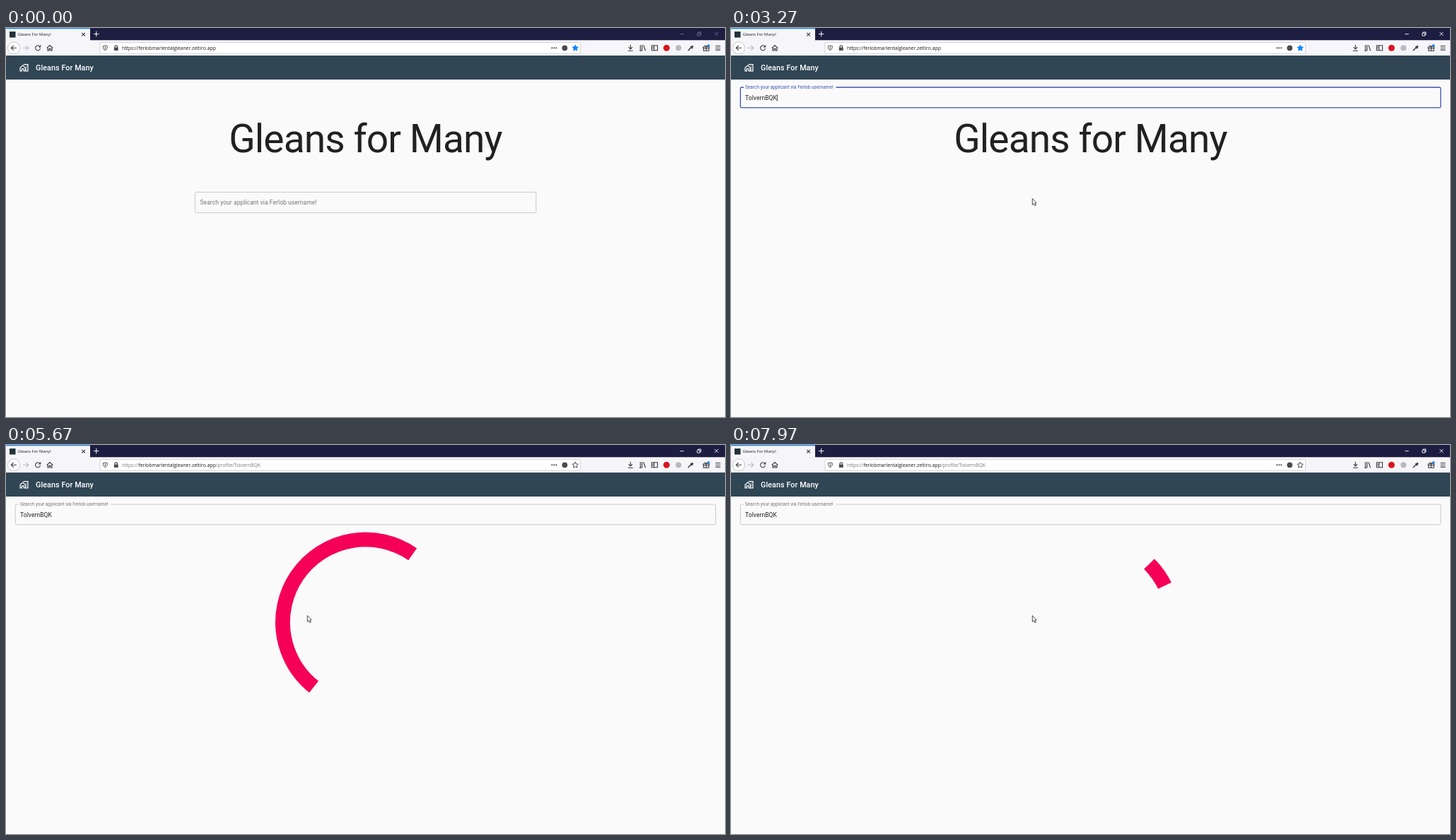
Animation of 1017 by 551 pixels, one loop 8000 ms. Source, as an HTML page:

```html
<!DOCTYPE html>
<html lang="en">
<head>
<meta charset="utf-8">
<title>Gleans For Many!</title>
<style>
html, body { margin: 0; width: 100%; height: 100%; overflow: hidden; background: #fafafa; }
svg { display: block; width: 1017px; height: 551px; }
text { font-family: Roboto, sans-serif; }
.ui { font-family: "Open Sans", "Noto Sans", sans-serif; }
.line { fill: none; stroke: #38383d; stroke-width: 1.1; }
.field { font-size: 8.48px; letter-spacing: .08px; }
</style>
</head>
<body>
<svg viewBox="0 0 1017 551" xmlns="http://www.w3.org/2000/svg">
  <rect width="1017" height="551" fill="#fafafa"/>

  <!-- page -->
  <text id="title" x="508.5" y="175.5" text-anchor="middle" font-size="55" letter-spacing="-.86" fill="#212121">Gleans for Many</text>
  <g id="middle">
    <rect id="middleBox" x="267.4" y="232.5" width="482.4" height="29.2" rx="2" fill="none" stroke-width=".9"/>
    <text class="field" x="274.5" y="250.1" fill="#757575">Search your applicant via Ferlob username!</text>
  </g>
  <g id="top">
    <path id="topBox" fill="none" d="M18 84H15.3a2 2 0 0 0-2 2V110.8a2 2 0 0 0 2 2H1001.8a2 2 0 0 0 2-2V86a2 2 0 0 0-2-2H148.5"/>
    <text id="label" x="20" y="86" font-size="6.4" letter-spacing=".06">Search your applicant via Ferlob username!</text>
    <text id="typed" class="field" x="20" y="101.8" fill="#212121"></text>
    <rect id="caret" y="94" width=".8" height="9.6" fill="#212121"/>
  </g>
  <circle id="spinner" cx="508.5" cy="251" r="117.07" fill="none" stroke="#f50057" stroke-width="20.86"/>

  <!-- app bar -->
  <rect y="39" width="1017" height="34" fill="#304654"/>
  <g fill="none" stroke="#fff" stroke-width="1.2">
    <path d="M20 56.2l3.7-3.2 3.7 3.2v4.7h-2.3v-3h-2.8v3H20zM24.5 51.6h6.5v9.3h-3.2"/>
    <path d="M28.8 53.7v1m0 1.2v1m0 1.2v1"/>
  </g>
  <text x="42" y="60" font-size="10.75" font-weight="500" letter-spacing=".08" fill="#fff">Gleans For Many</text>

  <!-- title bar -->
  <rect width="1017" height="17.5" fill="#1d1d42"/>
  <rect width="119" height="18" fill="#f6f5f9"/>
  <rect width="119" height="1.2" fill="#0a84ff"/>
  <rect x="5" y="5" width="8.5" height="8.5" fill="#20333a"/>
  <text class="ui" x="16.5" y="11.4" font-size="5.85" fill="#18191a">Gleans For Many!</text>
  <path class="line" d="M107.3 6.8l4.6 4.6m0-4.6l-4.6 4.6"/>
  <path d="M124 8.5h7.4M127.7 4.8v7.4" stroke="#f4f4fa" stroke-width="1.1"/>
  <path id="controls" fill="none" stroke-width=".9" d="M953.3 8.6h5.4M977.8 7.2h3.8v3.8h-3.8zM979.1 7V5.9h3.8v3.8h-1.1M1002.4 5.8l5 5m0-5l-5 5"/>

  <!-- toolbar -->
  <rect y="17.5" width="1017" height="21.5" fill="#f6f5f9"/>
  <circle cx="11" cy="28.3" r="8.6" fill="#fff" stroke="#b9b9be" stroke-width=".8"/>
  <path class="line" d="M15 28.3H7.3M10.7 24.9l-3.5 3.4 3.5 3.4"/>
  <path class="line" style="stroke:#b8b8bc" d="M24 28.3h7.7M28.3 24.9l3.5 3.4-3.5 3.4"/>
  <path class="line" d="M47.9 26.2a3.5 3.5 0 1 0 .6 2.8M48.7 24.3v2.7H46"/>
  <path class="line" d="M57.7 28.4l4.3-4 4.3 4M59 27.6v4.4h2v-2.6h2V32h2v-4.4"/>
  <rect x="133" y="20.4" width="679.6" height="15.8" rx="1.2" fill="#fff" stroke="#cccccf" stroke-width=".8"/>
  <path class="line" style="stroke-width:.9" d="M140.3 24.7l3 1c0 3-.8 4.9-3 6-2.200-1.100-3-3-3-6zM140.300 26v4.200"/>
  <path d="M152.800 27.600h5.900v4.300h-5.900z" fill="#4a4a4f"/>
  <path class="line" d="M154 28v-1.500a1.750 1.750 0 0 1 3.500 0V28"/>
  <text class="ui" x="164" y="31" font-size="6.87" fill="#18191a"><tspan id="scheme">https://</tspan><tspan>ferlobmarlentalgleaner.zeltiro.app</tspan><tspan id="path" fill="#77777b"></tspan></text>
  <g fill="#38383d">
    <circle cx="772.300" cy="28.300" r="1"/><circle cx="775.300" cy="28.300" r="1"/><circle cx="778.300" cy="28.300" r="1"/>
    <circle cx="790.300" cy="28.300" r="3.900" fill="#4a4a4f"/>
  </g>
  <path id="star" stroke-width=".9" stroke-linejoin="round"/>
  <g class="line">
    <path d="M883.300 23.700v6M880.600 27.200l2.700 2.700 2.700-2.700M879.800 32.300h7"/>
    <path d="M897.300 24v8.300M899.600 24v8.300M901.700 24.300l2.800 8M896 32.300h3.500"/>
    <path d="M913.300 24.800h8.200v7h-8.200zM916.600 25v6.800M914.300 27h1.400m-1.400 1.800h1.400"/>
    <path d="M964.700 32l4.300-4.300" stroke-width="1.500"/>
    <path d="M968 26.200l3 3" stroke-width="1.300"/><path d="M969.700 27.500l2-2" stroke-width="2.600"/>
    <path d="M986.700 28.700h7.400v3.500h-7.400zM986.200 26.700h8.400v2h-8.400zM990.400 26.700v5.500M990 26.300l-2-2M990.600 26.300l1.700-2"/>
    <path d="M1003.500 25.500h7m-7 2.800h7m-7 2.800h7"/>
  </g>
  <circle cx="934.300" cy="28.300" r="4.500" fill="#d8151f"/>
  <circle cx="951.200" cy="28.300" r="4" fill="#b9b9bd"/>
  <circle cx="993.800" cy="24.800" r="1.700" fill="#0a84ff"/>

  <path id="cursor" d="M0 0v8.800l2-1.900 1.500 3.200 1.500-.7-1.400-3.100h2.300z" fill="#fff" stroke="#222" stroke-width=".8"/>
</svg>
<script>
const LOOP = 8000, CLICK = 500, SLIDE = 540, SUBMIT = 3870;
const NAME = 'TolvernBQK';
const KEYS = [1100, 1370, 1500, 1630, 1830, 1900, 1990, 2700, 3130, 3265];
const $ = id => document.getElementById(id);
const set = (id, attrs) => { for (const k in attrs) $(id).setAttribute(k, attrs[k]); };
const show = (id, on) => set(id, { visibility: on ? 'visible' : 'hidden' });
const clamp = v => Math.min(1, Math.max(0, v));

// cubic-bezier(.42, 0, .58, 1)
function easeInOut(x) {
  let lo = 0, hi = 1, s = .5;
  for (let i = 0; i < 24; i++) {
    s = (lo + hi) / 2;
    const bx = 1.26 * s * (1 - s) ** 2 + 1.74 * s * s * (1 - s) + s ** 3;
    if (bx < x) lo = s; else hi = s;
  }
  return s * s * (3 - 2 * s);
}

// critically damped spring, from 1 to 0
function spring(ms) {
  const k = 13 * Math.max(0, ms) / 1000;
  return (1 + k) * Math.exp(-k);
}

function starPath(cx, cy, r) {
  let d = '';
  for (let i = 0; i < 10; i++) {
    const a = i * Math.PI / 5, q = i % 2 ? r * .48 : r;
    d += (i ? 'L' : 'M') + (cx + q * Math.sin(a)).toFixed(2) + ' ' + (cy - q * Math.cos(a)).toFixed(2);
  }
  return d + 'z';
}

function drawPointer(t) {
  const e = easeInOut(clamp((t - 20) / 430));
  const x = 1020 - 593.7 * e, y = 165 + 76.6 * e;
  set('cursor', { transform: `translate(${x} ${y})` });
  show('cursor', t >= 30);
  return x > 267 && x < 750 && y > 232;
}

function drawField(t, loading) {
  const count = KEYS.filter(k => t >= k).length;
  const color = loading ? '#c4c4c6' : '#3f51b5';
  show('top', t >= SLIDE);
  set('top', { transform: `translate(0 ${-80 * spring(t - SLIDE)})` });
  set('topBox', { stroke: color, 'stroke-width': loading ? .9 : 1.3 });
  set('label', { fill: loading ? '#757575' : color });
  $('typed').textContent = NAME.slice(0, count);
  set('caret', { x: 20 + (count ? $('typed').getComputedTextLength() : 0) });
  const blink = (t >= 2170 && t < 2570) || t >= 3730;
  show('caret', t >= SLIDE && !blink);
}

function drawSpinner(t) {
  const unit = 117.07 / 20.2;
  const age = t - 3847 - 26 * clamp((t - 4430) / 1240);
  const p = Math.max(0, age) / 1400 % 1;
  const grow = easeInOut(clamp(p * 2)), leave = easeInOut(clamp(p * 2 - 1));
  set('spinner', {
    'stroke-dasharray': `${(1 + 99 * grow) * unit} ${200 * unit}`,
    'stroke-dashoffset': -(15 * grow + 110 * leave) * unit,
    transform: `rotate(${360 * p} 508.5 251)`
  });
}

function render(t) {
  const loading = t >= SUBMIT;
  const hover = drawPointer(t);
  set('controls', { stroke: t < CLICK ? '#6c6c8c' : '#fff' });
  show('middle', t < SLIDE);
  set('middleBox', { stroke: t >= CLICK ? '#3f51b5' : hover ? '#212121' : '#c4c4c6' });
  drawField(t, loading);
  show('title', !loading);
  show('spinner', loading);
  drawSpinner(t);
  set('scheme', { fill: loading ? '#77777b' : '#18191a' });
  $('path').textContent = loading ? '/profile/' + NAME : '';
  set('star', { fill: loading ? 'none' : '#0a84ff', stroke: loading ? '#38383d' : '#0a84ff' });
}

set('star', { d: starPath(805.2, 28.5, 4.4) });
const start = performance.now();
function tick() {
  render((performance.now() - start) % LOOP);
  requestAnimationFrame(tick);
}
tick();
</script>
</body>
</html>
```
